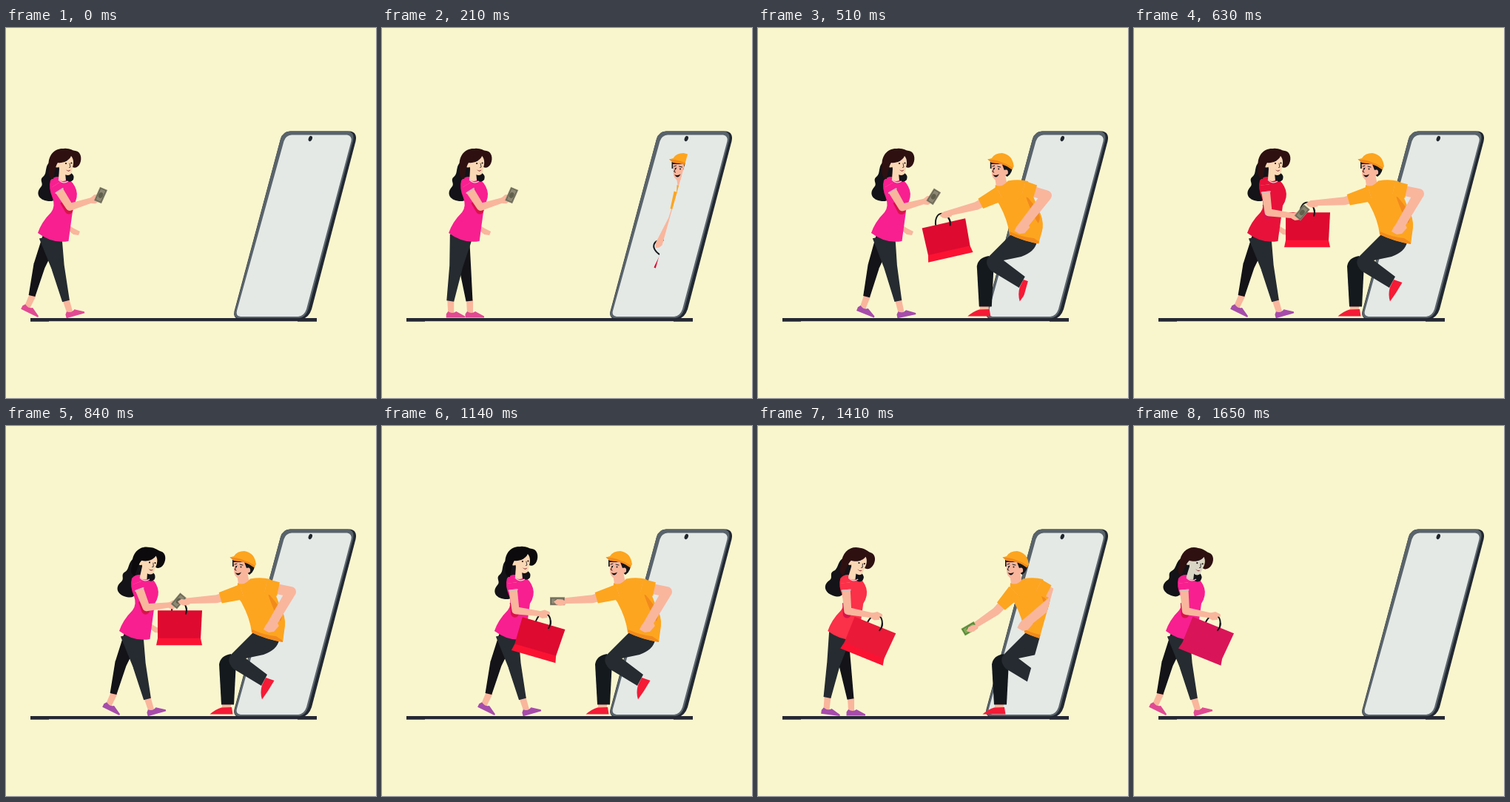
An HTML page for the animation above (1830 ms loop, 500 by 500 pixels).

```html
<!DOCTYPE html>
<html lang="en">
<head>
<meta charset="utf-8">
<title>Delivery</title>
<style>
  html, body { margin: 0; width: 100%; height: 100%; overflow: hidden; background: #f9f6ce; }
  svg { display: block; width: 100%; height: 100%; }
  .skin { fill: #f9b69d; }
  .face { fill: var(--face); }
  .dress { fill: var(--dress); }
  .hair { fill: var(--hair); }
  .shoe { fill: var(--shoe); }
  .bag { fill: var(--bag); }
  .flap { fill: var(--flap); }
  .note { fill: var(--note); }
  .shirt { fill: #fda51f; }
  .fold { fill: #f28a1c; }
  .red { fill: #f51a36; }
  .black { fill: #131318; }
  .slate { fill: #252b30; }
  .line { fill: none; stroke: #15171b; stroke-linecap: round; }
</style>
</head>
<body>
<svg viewBox="0 0 500 500">
  <defs>
    <clipPath id="portal"><path d="M0 0H461L320.500 500H0Z"/></clipPath>
    <g id="foot">
      <path class="skin" d="M-4-2H5L5 16H-3Z"/>
      <path class="shoe" d="M-5.500 22.500V17.500L-3 14Q3 18 8 14L20 20.500V22.500Z"/>
    </g>
  </defs>

  <path fill="#252733" d="M33 392H420V396.800H394V396.200H58V396.800H33Z"/>
  <path fill="#222831" d="M371 150Q374 140 384 139.500H465Q475 141 472.500 153L413 380Q409 392 400 393H313Q307 391 308.500 383Z"/>
  <path fill="#59636a" d="M371 150Q374 140 384 139.500H462Q471.500 141 469 152L408.500 380Q405 391 396 392H313Q307 391 309 383Z"/>
  <path fill="#e4e9e6" d="M375.500 153Q378 145 386 144.500H461Q468 146 466.500 153L406 380Q403 389 395 390H317Q310 389 312 382Z"/>
  <ellipse cx="411.300" cy="149.500" rx="2.500" ry="3.700" fill="#20262d" transform="rotate(20 411.300 149.500)"/>

  <g clip-path="url(#portal)">
    <g class="woman">
      <path class="black nod" d="M64 178C50 184 57 196 50 201C44 206 52 210 47 215C39 224 45 234 60 234C70 234 72 224 70 212L74 190Z"/>
      <path class="skin" d="M84 266L92 271L100 275L98 280L91 279L85 274Z"/>
      <use id="footB" href="#foot"/>
      <path id="legB" class="black"/>
      <use id="footA" href="#foot"/>
      <path id="legA" class="slate"/>
      <path class="dress" d="M60 206Q64 201 70 201L83 203Q92 209 95 219Q98 229 91 240Q88 262 84.500 288Q63 292 43 277Q48 262 61 249Q67 241 63 230Q57 216 60 206Z"/>
      <g class="nod">
        <path class="face" d="M72 190H82V205Q77 209 71 205Z"/>
        <path class="black" d="M80 196Q84 200 88 196Q93 199 91 205Q87 210 81 206Z"/>
        <path class="face" d="M68 174H90C91 184 90 192 88 197Q84 201 78 197L72 190Z"/>
        <circle class="face" cx="69" cy="185" r="3.500"/>
        <path class="hair" d="M58 190C55 172 66 162 78 163C86 162 90 166 94 166C101 167 103 176 100 183C98 188 93 190 90 188C92 182 91 176 88 173C85 180 76 183 70 182C67 186 66 194 64 204C58 204 57 196 58 190Z"/>
        <g fill="#20130f"><circle cx="81" cy="183" r="1.100"/><circle cx="88.500" cy="182.500" r="1.100"/></g>
        <path class="line" stroke-width=".8" d="M79 179.500L82 179M86 183L87 188L85.500 188.500"/>
        <path fill="#7d1822" d="M80.500 191Q84 194 87.500 191.500Q85 196 80.500 191Z"/>
      </g>
      <path fill="none" stroke="#f6cbd4" stroke-width="1.200" d="M71 205Q77 211.500 84 207"/>
    </g>

    <g class="man">
      <path class="skin" d="M292 374H304V382H292Z"/>
      <path class="red" d="M275.500 389.500Q283 383 291 380.500L305 380L306.500 389.500Z"/>
      <path fill="#14191e" d="M288 322Q290 310 304 308L311 318L308 376.500H291Z"/>
      <path class="red" d="M351 340L362.500 344L354 358L346 369.500Q343 360 346 350Z"/>
      <path class="slate" d="M334 279L369 289Q367 302 348 309L324 314L353 336L345 351L307 328Q296 316 306 307Z"/>
      <path class="skin" d="M312 200L326 197L329 212Q321 219 314 213Z"/>
      <path class="shirt" d="M313 212Q321 217 330 206.500Q345 204 357 207L362 222L371 245Q378 257 377 270L374 292Q350 288 332 279Q330 260 318 238L312 230Z"/>
      <path class="fold" d="M353 224L369 244Q376 255 371 264Q362 252 353 224ZM332.500 275Q350 283 365 284L374 290V292Q352 288 332 279Z"/>
      <path id="backArm" class="skin"/>
      <path id="backSleeve" class="shirt"/>
      <path id="backHand" class="skin" d="M-10 5Q-6-6 5-10L11 0L4 8L-3 9Z"/>
      <path fill="#14161a" d="M306 181L336 184Q337 196 329 201L324 197L320 188L306 190Z"/>
      <path class="skin" d="M307.500 184H322L325 192Q331 190 330 197L325 200Q322 206 315 206Q308 204 308 195Z"/>
      <path class="shirt" d="M302.500 177.500L308 176Q312 169 322 169Q336 171 338 187L335 191Q326 183 308 182Z"/>
      <path class="fold" d="M302.500 177.500Q318 177 337 189L335 191Q326 183 308 182Z"/>
      <path class="line" stroke-width="1" d="M309 187L312 186M316 187L320 188M312 189L309 194L311 195"/>
      <g fill="#15171b"><circle cx="311" cy="190" r="1"/><circle cx="317.500" cy="190.500" r="1"/><path d="M309.500 198Q314 200 318 197.500Q314 205 309.500 198Z"/></g>
    </g>

    <!-- Origin at the top of the handle. -->
    <g id="bag">
      <path class="line" stroke-width="2" d="M-10 18C-11 5-5-1 0-1S11 5 10 18"/>
      <path class="bag" d="M-29 12.500H31L29 51H-29Z"/>
      <path class="flap" d="M-29 50H29L31 59.500H-31Z"/>
      <path class="line" stroke-width="2" d="M9 17Q11 11 9 7"/>
    </g>

    <g class="man">
      <path id="frontArm" class="skin"/>
      <path id="frontSleeve" class="shirt"/>
    </g>

    <g class="woman">
      <path id="shade" fill="#d8134a"/>
      <path id="arm" class="skin"/>
      <path id="sleeve" class="dress"/>
      <path id="cuff" fill="#d5b9bb"/>
      <path id="hand" class="skin" d="M-7-3L0-6L7-4L8-1L4 0L5 4L-2 6L-7 4Z"/>
    </g>

    <g id="note">
      <path class="note" d="M-10-5.500H10V5.500H-10Z"/>
      <path fill="none" stroke="#343a26" stroke-opacity=".5" d="M-8.500-4H8.500V4H-8.500Z"/>
      <ellipse rx="4" ry="3" fill="#343a26" fill-opacity=".5"/>
    </g>
    <path id="fingers" class="skin" d="M-6 0L-1-3L5-2L10 0V5L2 6L-3 4Z"/>
  </g>
</svg>

<script>
const LOOP = 1830, STEP = 30, LAST = 1650;
const { PI, sin, cos, atan2, hypot, min, max } = Math;
const DEG = PI / 180;

const $ = id => document.getElementById(id);
const each = (selector, fn) => document.querySelectorAll(selector).forEach(fn);

// Progress from 0 to 1 between two times, and a rise and fall between them.
const ramp = (t, from, to) => min(1, max(0, (t - from) / (to - from)));
const bump = (t, from, to) => sin(PI * ramp(t, from, to));

const mix = (a, b, k) => a.map((v, i) => v + (b[i] - v) * k);
const shift = ([x, y], dx, dy = 0) => [x + dx, y + dy];
const heading = (a, b) => atan2(b[1] - a[1], b[0] - a[0]) / DEG;

const place = (el, [x, y], turn = 0) =>
  el.setAttribute('transform', `translate(${x} ${y}) rotate(${turn})`);

// Tapered limb along joints, rounded at the inner ones.
function limb(id, points, widths) {
  let d = '';
  for (let i = 1; i < points.length; i++) {
    const [ax, ay] = points[i - 1], [bx, by] = points[i];
    const length = hypot(bx - ax, by - ay) || 1;
    const nx = (ay - by) / length / 2, ny = (bx - ax) / length / 2;
    const u = widths[i - 1], v = widths[i], r = v / 2;
    d += `M${ax + nx * u} ${ay + ny * u}L${bx + nx * v} ${by + ny * v}` +
         `L${bx - nx * v} ${by - ny * v}L${ax - nx * u} ${ay - ny * u}Z`;
    if (i < points.length - 1) {
      d += `M${bx - r} ${by}a${r} ${r} 0 0 0 ${v} 0a${r} ${r} 0 0 0 ${-v} 0Z`;
    }
  }
  $(id).setAttribute('d', d);
}

function leg(side, hip, x, widths) {
  const behind = max(0, 45 - x), ahead = max(0, x - 75);
  const ankle = [x, 369 - behind * 0.7];
  const knee = shift(mix(hip, ankle, 0.47), -behind * 0.3);
  limb('leg' + side, [hip, knee, ankle], widths);
  place($('foot' + side), ankle, (behind - ahead) * 2.6);
}

// Returns where the hand is on the stage.
function drawWoman(t) {
  const x = 110 * (ramp(t, 0, 490) - ramp(t, 1135, LAST));
  const swing = cos(2 * PI * (ramp(t, 0, 540) + ramp(t, 1140, LAST)));
  const stride = 19.5 * swing + 3.5 * swing ** 2;
  const nod = 9 * bump(t, 630, 1080) + 13 * ramp(t, 1140, 1420);
  const lower = 0.9 * ramp(t, 500, 630) - 0.5 * bump(t, 630, 1050) + 0.1 * ramp(t, 1140, 1410);

  each('.woman', g => place(g, [x, 0]));
  each('.nod', g => g.setAttribute('transform', `rotate(${nod} 74 203)`));
  leg('A', [60, 281], 58 + stride, [31, 18, 10]);
  leg('B', [60, 284], 58 - stride, [22, 16, 9]);

  const shoulder = [67, 212];
  const elbow = mix([86, 242], [70, 250], lower);
  const hand = mix([121, 231], [109, 257], lower);
  const cuff = mix(shoulder, elbow, 0.24);
  const under = [mix(shoulder, elbow, 0.6), elbow, mix(elbow, hand, 0.1)];
  limb('shade', under.map(p => shift(p, -1, 4)), [10, 11, 6]);
  limb('arm', [shoulder, elbow, mix(elbow, hand, 0.88)], [12, 10, 7]);
  limb('sleeve', [shoulder, cuff], [14, 14]);
  limb('cuff', [cuff, mix(shoulder, elbow, 0.29)], [13, 13]);
  place($('hand'), hand, heading(elbow, hand));
  return shift(hand, x);
}

// Returns where the reaching hand is on the stage; rest is 1 with the arm down.
function drawMan(t, rest) {
  const x = 140 * (1 - ramp(t, 0, 540) + ramp(t, 1230, LAST) ** 1.9);
  each('.man', g => place(g, [x, 0]));

  const shoulder = [319, 224];
  const angle = (171 - 56 * rest) * DEG, reach = 82 - 7 * rest;
  const hand = shift(shoulder, reach * cos(angle), reach * sin(angle));
  const elbow = shift(mix(shoulder, hand, 0.45), 2, 4);
  limb('frontArm', [shoulder, elbow, hand], [13, 11, 7]);
  limb('frontSleeve', [shoulder, mix(shoulder, elbow, 0.85 - 0.2 * rest)], [21, 15]);

  const backShoulder = [351, 217];
  const backElbow = mix([385, 224], [371, 236], rest);
  const backHand = mix([358, 270], [311, 266], rest);
  limb('backArm', [backShoulder, backElbow, backHand], [14, 14, 12]);
  limb('backSleeve', [backShoulder, mix(backShoulder, backElbow, 0.5)], [21, 19]);
  place($('backHand'), backHand);
  place($('fingers'), shift(hand, x), heading(hand, elbow));
  return shift(hand, x);
}

function tint(t) {
  const between = (from, to) => t >= from && t < to;
  const parting = between(1290, 1530), end = t >= 1530;
  const colors = {
    dress: between(570, 720) ? '#e8113a' : parting ? '#fb3049' : '#f81f90',
    hair: between(720, 1290) ? '#0c0a0c' : '#2e1011',
    face: end ? '#dad6c5' : '#fbd8b5',
    shoe: between(300, 1530) ? '#a64cab' : '#e14a93',
    bag: end ? '#da1458' : parting ? '#ea1937' : '#de0a30',
    flap: end ? '#da1458' : '#fb1233',
    note: t >= 1290 ? '#78ac50' : '#8d8874'
  };
  for (const name in colors) document.body.style.setProperty('--' + name, colors[name]);
}

function draw(t) {
  const arrive = 1 - ramp(t, 390, 540), leave = ramp(t, 1230, 1560);
  const handOver = ramp(t, 840, 1110);
  tint(t);
  const woman = drawWoman(t), man = drawMan(t, arrive + leave);

  const bagTilt = 22 * ramp(t, 840, 1250) - 64 * arrive;
  place($('bag'), mix(shift(man, -4), shift(woman, 2), handOver), bagTilt);

  const noteTurn = 16 * ramp(t, 390, 630) + 50 * handOver - 56 * leave - 66;
  place($('note'), mix(shift(woman, 7, -5), shift(man, -1), handOver), noteTurn);
}

function tick() {
  const elapsed = performance.now() % LOOP;
  draw(min(LAST, elapsed - elapsed % STEP));
  requestAnimationFrame(tick);
}
tick();
</script>
</body>
</html>
```
